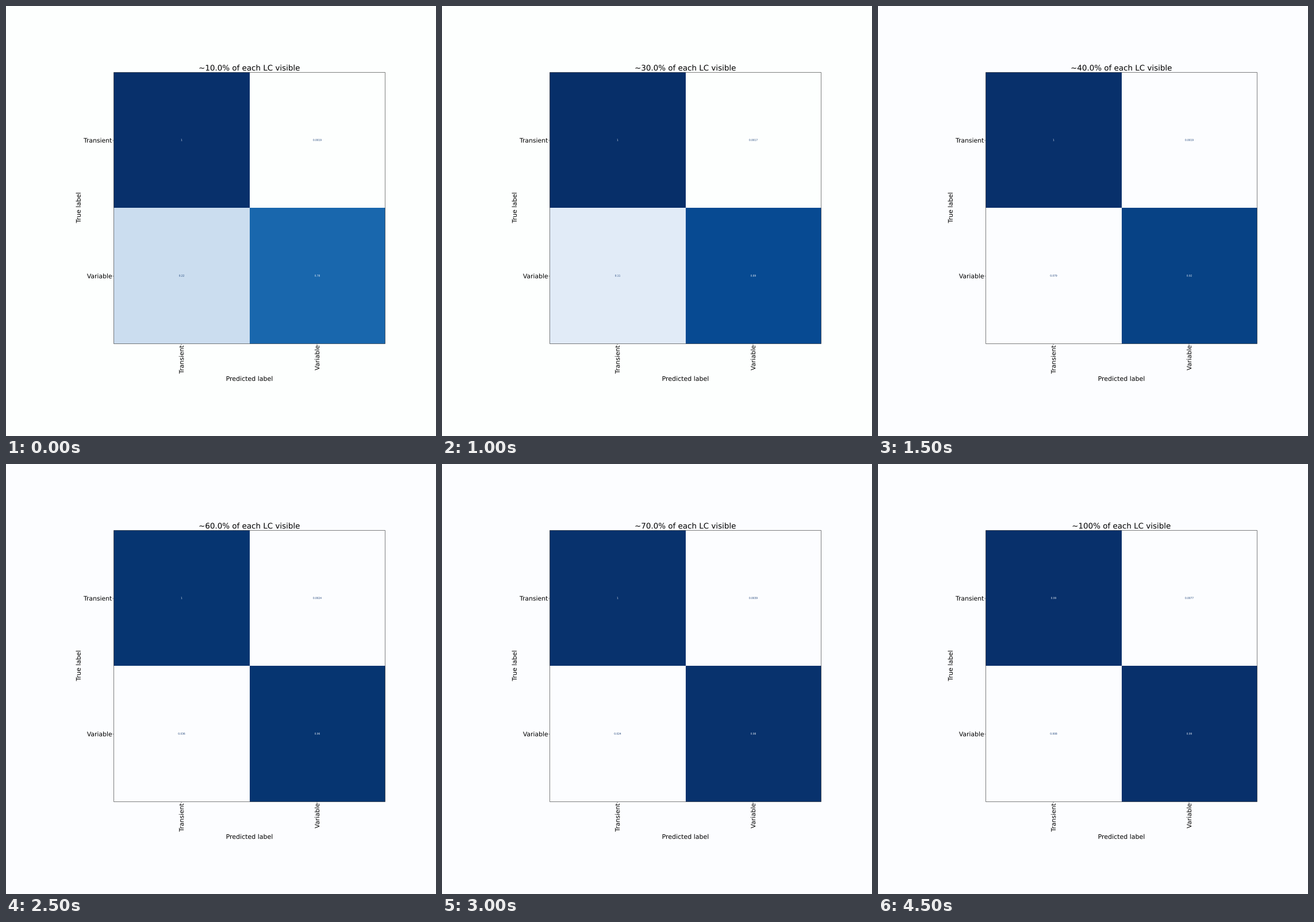
A matplotlib script for the animation above (5 s loop, 748 by 748 pixels).

```python
import matplotlib.pyplot as plt
from matplotlib.animation import FuncAnimation
from matplotlib.patches import PathPatch, Rectangle
from matplotlib.textpath import TextPath
from matplotlib.transforms import Affine2D

SIZE, DPI = 748, 100
LEFT, MID_X, RIGHT = 187.5, 424, 659.5
TOP, MID_Y, BOTTOM = 115.5, 351, 587.5
COL_X, ROW_Y = (305.5, 541.5), (233.5, 469.5)
TITLE, LABEL, TICK, CELL = 13.45, 11.0, 10.8, 4.32
PALE, NAVY = "#fcfdff", "#08306b"

# cell texts and cell colours, row by row
STEPS = [
    ("1 0.0019 0.22 0.78", NAVY, "#cbddef", "#1967ad"),
    ("1 0.0016 0.15 0.85", NAVY, "#d9e7f5", "#0c57a0"),
    ("1 0.0017 0.11 0.89", "#072f69", "#e1ebf7", "#074a92"),
    ("1 0.0019 0.079 0.92", NAVY, PALE, "#074285"),
    ("1 0.0014 0.052 0.95", "#063672", PALE, "#063672"),
    ("1 0.0024 0.036 0.96", "#063571", PALE, "#063571"),
    ("1 0.0039 0.024 0.98", "#08326d", PALE, "#08326d"),
    ("0.99 0.0052 0.016 0.98", "#08316c", PALE, "#08316c"),
    ("0.99 0.0064 0.011 0.99", NAVY, PALE, NAVY),
    ("0.99 0.0077 0.008 0.99", NAVY, PALE, NAVY),
]

fig = plt.figure(figsize=(SIZE / DPI, SIZE / DPI), dpi=DPI)
ax = fig.add_axes([0, 0, 1, 1])
ax.set(xlim=(0, SIZE), ylim=(SIZE, 0))
ax.axis("off")


def text_path(s, x, y, size, align=0.5, turned=False):
    """Outline of s; (x, y) is on the baseline at the share `align` of its ink."""
    path = TextPath((0, 0), s, size=size, prop={"family": "DejaVu Sans"})
    box = path.get_extents()
    shift = Affine2D().translate(-(box.x0 + align * box.width), 0).scale(1, -1)
    if turned:
        shift.rotate_deg(-90)
    return shift.translate(x, y).transform_path(path)


def add_text(*args, color="black", **kw):
    patch = PathPatch(text_path(*args, **kw), fc=color, lw=0, zorder=4)
    return ax.add_patch(patch)


def add_rect(x0, y0, x1, y1, **kw):
    return ax.add_patch(Rectangle((x0, y0), x1 - x0, y1 - y0, snap=False, **kw))


back = add_rect(0, 0, SIZE, SIZE, lw=0, zorder=0)
cells = [
    add_rect(x0, y0, x1, y1, lw=0, zorder=1)
    for y0, y1 in ((TOP, MID_Y), (MID_Y, BOTTOM))
    for x0, x1 in ((LEFT, MID_X), (MID_X, RIGHT))
]
add_rect(LEFT, TOP, RIGHT, BOTTOM, fill=False, ec=(0, 0, 0, 0.5), lw=0.72, zorder=3)

for name, x, y in zip(("Transient", "Variable"), COL_X, ROW_Y):
    ax.plot([x, x], [BOTTOM, BOTTOM + 2], color="black", lw=0.3)
    ax.plot([LEFT - 2, LEFT], [y, y], color="black", lw=0.3)
    add_text(name, x + 3.6, 590.6, TICK, align=1, turned=True)
    add_text(name, 184, y + 4.1, TICK, align=1)

add_text("Predicted label", 423.5, 652.1, LABEL)
add_text("True label", 129.9, 351.3, LABEL, turned=True)

title = add_text("~", 423.6, 112.3, TITLE)
spots = [(x, y + 1.1) for y in ROW_Y for x in COL_X]
values = [add_text("1", x, y, CELL) for x, y in spots]


def draw(i):
    texts, first, third, fourth = STEPS[i]
    paper = "#fdfffe" if i < 3 else PALE
    back.set_facecolor(paper)
    share = f"{10.0 * (i + 1):.1f}" if i < 9 else "100"
    title.set_path(text_path(f"~{share}% of each LC visible", 423.6, 112.3, TITLE))
    fills = (first, paper, third, fourth)
    inks = ("#f7fbff", NAVY, NAVY, "#f7fbff")
    for cell, value, fill, ink, s, (x, y) in zip(
        cells, values, fills, inks, texts.split(), spots
    ):
        cell.set_facecolor(fill)
        value.set_facecolor(ink)
        value.set_path(text_path(s, x, y, CELL))
    return [back, title, *cells, *values]


anim = FuncAnimation(
    fig, draw, frames=len(STEPS), interval=500, repeat=True, repeat_delay=0, blit=False
)
plt.show()
```
